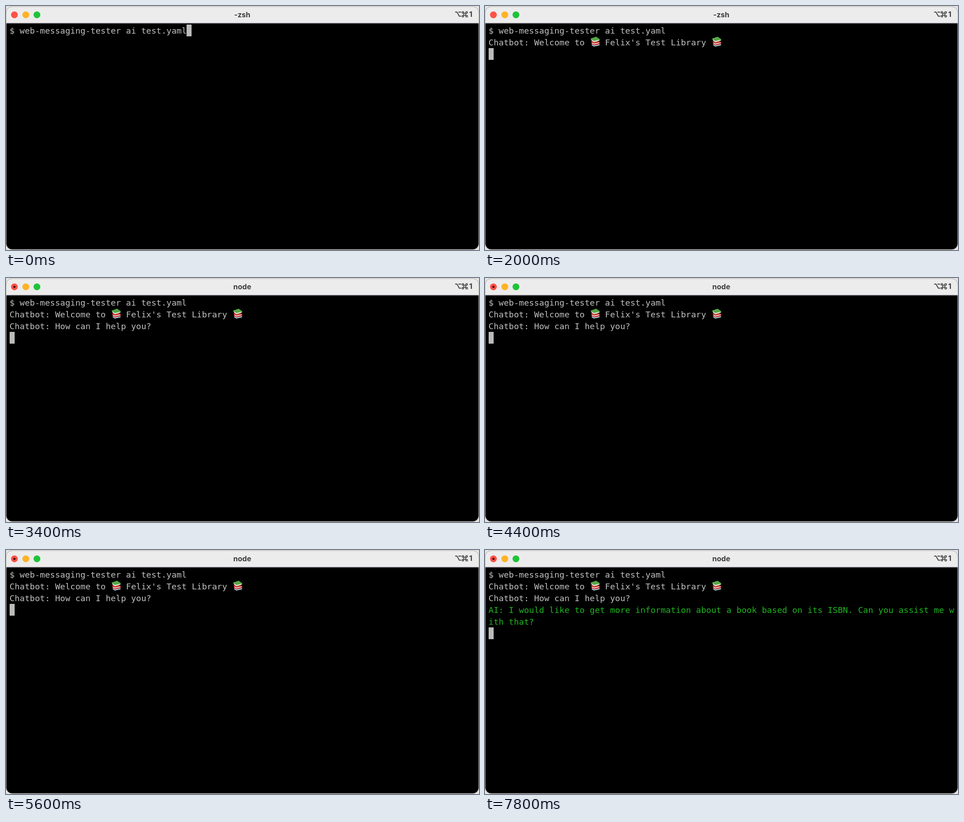
Animation of 1040 by 539 pixels, one loop 8 s. Source, as an HTML page with a canvas:

```html
<!DOCTYPE html>
<html lang="en">
<head>
<meta charset="utf-8">
<title>Terminal session</title>
<style>
  html, body { margin: 0; width: 100%; height: 100%; overflow: hidden; background: #e4e4e4; }
  canvas { display: block; }
</style>
</head>
<body>
<canvas id="stage" width="1040" height="539"></canvas>
<script>
const ctx = document.getElementById('stage').getContext('2d');
const LOOP = 8000;
const LEFT = 7.8, TOP = 41, CELL = 11.13, ROW = 26;
const GREY = '#bfbfbf', GREEN = '#1fb41f', INK = '#3c3c3c';
const MONO = '18.49px "DejaVu Sans Mono", monospace';
const BOLD = '700 16px Inter, sans-serif';

// Output rows, each with the time it appears.
const rows = [
  { at: 0, text: '$ web-messaging-tester ai test.yaml' },
  { at: 2000, text: "Chatbot: Welcome to    Felix's Test Library", books: [20, 44] },
  { at: 3400, text: 'Chatbot: How can I help you?' },
  { at: 6200, color: GREEN, text: 'AI: I would like to get more information about a book based on its ISBN. Can you assist me w' },
  { at: 6200, color: GREEN, text: 'ith that?' }
];
const ENTER_AT = 1000, TITLE_AT = 2800;

function disc(x, y, r, color) {
  ctx.fillStyle = color;
  ctx.beginPath();
  ctx.arc(x, y, r, 0, Math.PI * 2);
  ctx.fill();
}

function shape(path, color) {
  ctx.fillStyle = color;
  ctx.fill(new Path2D(path));
}

function label(text, x, y, font, color, align = 'left') {
  ctx.font = font;
  ctx.fillStyle = color;
  ctx.textAlign = align;
  ctx.fillText(text, x, y);
}

function drawBooks(x, y) {
  ctx.save();
  ctx.translate(x, y);
  shape('M3 17 L15 15 L21 18 L21 20 L8 23 L3 20Z', '#39688e');
  shape('M4 18 L8 20.5 L20 18 L20 19.5 L8 22 L4 20Z', '#e4e0d8');
  shape('M2 11 L14 9 L21 13 L21 14 L8 17 L21 15 L21 17 L8 20 L3 17Z', '#c92f2b');
  shape('M4 14 L8 16 L20 13.5 L20 15 L8 18 L4 16Z', '#eee8dd');
  shape('M1 5 L13 1 L21 7 L21 8.5 L8 13 L2 8Z', '#398c37');
  shape('M2 6.5 L8 10 L20 7.5 L20 9.5 L8 13 L3 9.5Z', '#e9e8d9');
  shape('M1 5 L13 1 L21 6.5 L8 10.5Z', '#55a947');
  ctx.restore();
}

function drawShortcut() {
  ctx.strokeStyle = INK;
  ctx.lineWidth = 1.9;
  ctx.stroke(new Path2D('M987.5 13.5h4.2l5 9h4M995 13.5h5.7'));
  ctx.lineWidth = 1.6;
  ctx.strokeRect(1006.5, 16, 4.5, 4.5);
  for (const [x, y] of [[1004.6, 14.1], [1012.9, 14.1], [1004.6, 22.4], [1012.9, 22.4]]) {
    ctx.beginPath();
    ctx.arc(x, y, 1.9, 0, Math.PI * 2);
    ctx.stroke();
  }
  label('1', 1025.5, 24, BOLD, INK, 'right');
}

function drawWindow(running) {
  ctx.fillStyle = '#e4e4e4';
  ctx.fillRect(0, 0, 1040, 539);
  ctx.save();
  ctx.beginPath();
  ctx.roundRect(0.5, 1.5, 1039, 536.5, 13);
  ctx.clip();
  ctx.fillStyle = '#000';
  ctx.fillRect(0, 0, 1040, 539);
  ctx.fillStyle = '#ececec';
  ctx.fillRect(0, 0, 1040, 38);
  ctx.fillStyle = '#b3b0b8';
  ctx.fillRect(0, 37, 1040, 1.5);
  ctx.restore();
  ctx.strokeStyle = '#b9b9b2';
  ctx.lineWidth = 1;
  ctx.beginPath();
  ctx.roundRect(0.5, 1.5, 1039, 536.5, 13);
  ctx.stroke();

  disc(18.5, 19.5, 7.5, '#ff5148');
  disc(43.5, 19.5, 7.5, '#ffb324');
  disc(68, 19.5, 7.5, '#20c338');
  if (running) disc(18.5, 19.5, 2.5, '#4c0503');
  label(running ? 'node' : '-zsh', 519.5, 25, BOLD, INK, 'center');
  drawShortcut();
}

function draw(t) {
  drawWindow(t >= TITLE_AT);
  const shown = rows.filter(row => t >= row.at);
  shown.forEach((row, i) => {
    const y = TOP + i * ROW;
    label(row.text, LEFT, y + 20, MONO, row.color || GREY);
    for (const col of row.books || []) drawBooks(LEFT + col * CELL + 1, y);
  });

  const entered = t >= ENTER_AT;
  const col = entered ? 0 : rows[0].text.length;
  const line = entered ? shown.length : 0;
  ctx.fillStyle = '#bbbbbb';
  ctx.fillRect(Math.round(LEFT + col * CELL), TOP + line * ROW, 11, ROW);
}

const start = performance.now();
function tick() {
  draw((performance.now() - start) % LOOP);
  requestAnimationFrame(tick);
}
tick();
</script>
</body>
</html>
```
